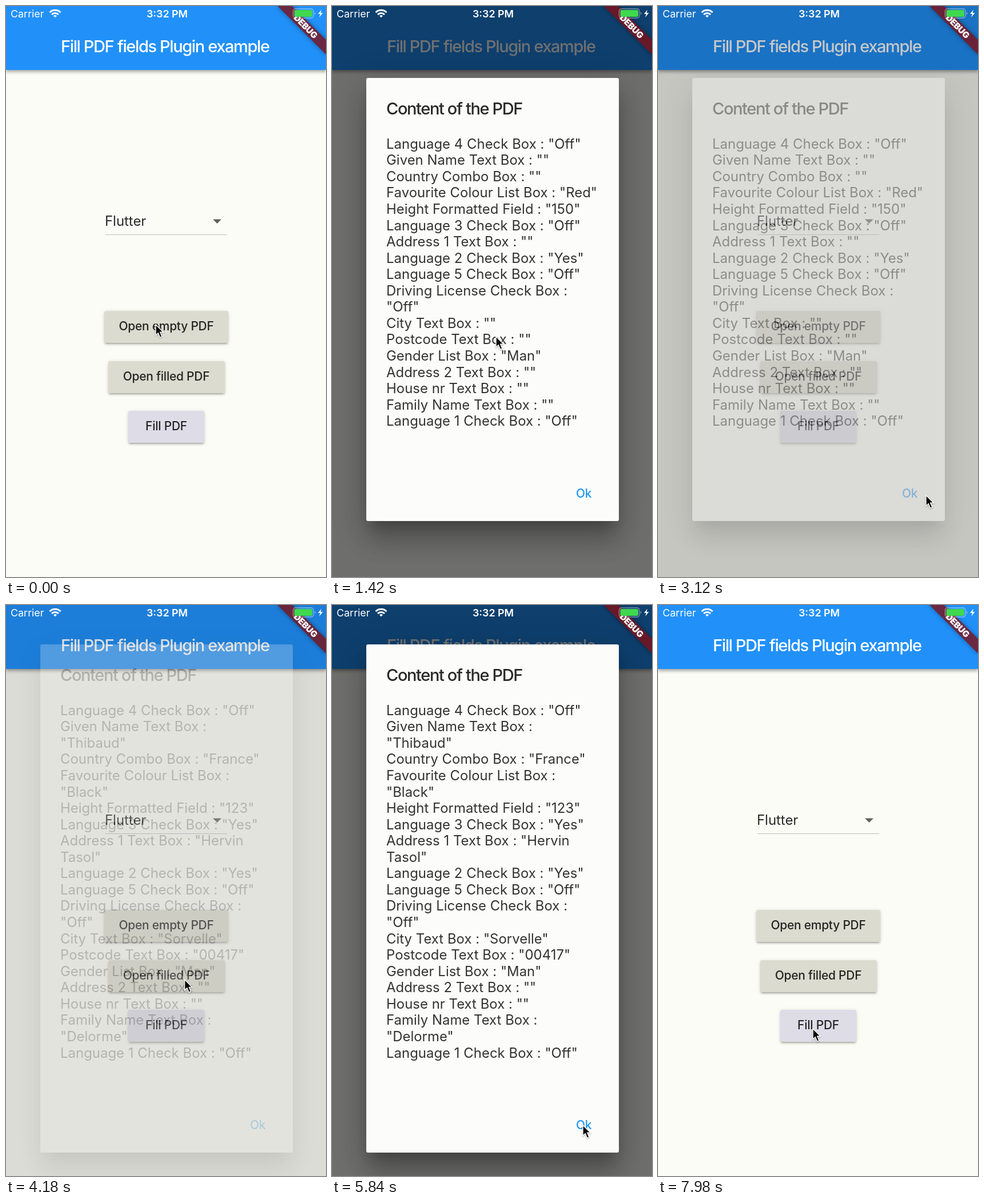
Animation, 560 px wide and 1000 px high, one loop 8000 ms. Source, as an HTML page:

```html
<!DOCTYPE html>
<html lang="en">
<head>
<meta charset="utf-8">
<title>Fill PDF fields</title>
<style>
  html, body { margin: 0; width: 100%; height: 100%; overflow: hidden; }
  body { position: relative; background: #fcfcf6; font: 23.9px/40px Inter, "Open Sans", sans-serif; color: rgba(0,0,0,.84); }
  body *, svg { position: absolute; }
  .t { white-space: pre; line-height: 40px; margin-top: -20px; }
  .mid { left: 0; width: 560px; text-align: center; }
  .title { font-size: 29px; font-weight: 500; letter-spacing: -1.38px; }
  .bar { left: 0; top: 0; width: 560px; height: 112px; background: #2191f9; color: #fff; box-shadow: 0 3px 6px rgba(0,0,0,.38); }
  .btn { height: 56px; border-radius: 3px; background: #dbdbcf; font-size: 20.9px; font-weight: 500; letter-spacing: -.2px;
    line-height: 54px; text-align: center; white-space: pre;
    box-shadow: 0 4px 2px -3px rgba(0,0,0,.2), 0 3px 3px rgba(0,0,0,.14), 0 1px 7px rgba(0,0,0,.12); }
  .rule { left: 174px; top: 400px; width: 213px; height: 1px; background: #bdbdbd; }
  #shade { inset: 0; background: rgba(0,0,0,.56); }
  .dialog { left: 59.5px; width: 442.5px; border-radius: 3px; background: #fcfcfa;
    box-shadow: 0 16px 22px -10px rgba(0,0,0,.2), 0 36px 40px -2px rgba(0,0,0,.2), 0 13px 60px 10px rgba(0,0,0,.12); }
  .dialog .title { left: 35.5px; top: 54px; }
  .body { left: 35.5px; top: 101.7px; white-space: pre; line-height: 28.57px; letter-spacing: .03px; color: rgba(0,0,0,.8); }
  .ok { left: 367.5px; bottom: 28px; font-size: 20.9px; font-weight: 500; letter-spacing: -.2px; color: #2196f3; }
  .band { left: 500px; top: 41.8px; width: 120px; height: 17.9px; transform-origin: 60px -41.8px; transform: rotate(45deg);
    background: rgba(122,18,26,.82); box-shadow: 0 0 9px rgba(0,0,0,.4); color: #fff;
    font-size: 15.2px; font-weight: 900; line-height: 18px; text-align: center; letter-spacing: -.3px; }
  .status { color: #fff; font-size: 17.9px; top: 13.5px; }
  svg { left: 0; top: 0; overflow: visible; }
</style>
</head>
<body>
<div class="bar"><div class="t title" style="left:96px;top:71px">Fill PDF fields Plugin example</div></div>
<div class="t" style="left:173px;top:377px">Flutter</div>
<svg width="560" height="1000"><path d="M362 373.5h15l-7.5 7.5z" fill="#606060"/></svg>
<div class="rule"></div>
<div class="btn" style="left:172px;top:534px;width:217px">Open empty PDF</div>
<div class="btn" style="left:178.5px;top:621.5px;width:204px">Open filled PDF</div>
<div class="btn" style="left:214px;top:709px;width:133px;background:#dedce7">Fill PDF</div>

<div id="shade"></div>
<div class="dialog" style="top:126px;height:776px">
  <div class="t title">Content of the PDF</div>
  <div class="body">Language 4 Check Box : "Off"
Given Name Text Box : ""
Country Combo Box : ""
Favourite Colour List Box : "Red"
Height Formatted Field : "150"
Language 3 Check Box : "Off"
Address 1 Text Box : ""
Language 2 Check Box : "Yes"
Language 5 Check Box : "Off"
Driving License Check Box :
"Off"
City Text Box : ""
Postcode Text Box : ""
Gender List Box : "Man"
Address 2 Text Box : ""
House nr Text Box : ""
Family Name Text Box : ""
Language 1 Check Box : "Off"</div>
  <div class="t ok">Ok</div>
</div>
<div class="dialog" style="top:69px;height:890px">
  <div class="t title">Content of the PDF</div>
  <div class="body">Language 4 Check Box : "Off"
Given Name Text Box :
"Thibaud"
Country Combo Box : "France"
Favourite Colour List Box :
"Black"
Height Formatted Field : "123"
Language 3 Check Box : "Yes"
Address 1 Text Box : "Hervin
Tasol"
Language 2 Check Box : "Yes"
Language 5 Check Box : "Off"
Driving License Check Box :
"Off"
City Text Box : "Sorvelle"
Postcode Text Box : "00417"
Gender List Box : "Man"
Address 2 Text Box : ""
House nr Text Box : ""
Family Name Text Box :
"Delorme"
Language 1 Check Box : "Off"</div>
  <div class="t ok">Ok</div>
</div>

<div class="band">DEBUG</div>
<div class="t status" style="left:8px">Carrier</div>
<div class="t status mid" style="left:2px;font-weight:600">3:32 PM</div>
<svg width="560" height="1000">
  <g fill="none" stroke="#fff" stroke-width="3">
    <path d="M76.5 11.2a13.5 13.5 0 0 1 19 0M80 15a8.5 8.5 0 0 1 12 0"/>
    <path d="M83 17.2q3-2.4 6 0l-3 3z" fill="#fff" stroke="none"/>
  </g>
  <rect x="502.5" y="5" width="35.5" height="16" rx="4" fill="none" stroke="#fff" stroke-opacity=".45" stroke-width="1.4"/>
  <rect x="504.5" y="7" width="31.5" height="12" rx="2" fill="#3fd84f"/>
  <path d="M540 10.5q3 2.5 0 5z" fill="#fff" fill-opacity=".5"/>
  <path d="M552 6.5l-6 7.5h4l-2 6 6.5-8h-4z" fill="#fff"/>
  <path id="cursor" d="M0 0V18.5L4.2 14.6 7.6 22.4 11 20.9 7.7 13.3H13.3z" stroke="#fff" stroke-width="1.4"
    style="filter:drop-shadow(0 1px 1px rgba(0,0,0,.35))"/>
</svg>

<script>
const LOOP = 8000, FADE = 180;
const shade = document.getElementById('shade');
const cursor = document.getElementById('cursor');
const dialogs = [...document.querySelectorAll('.dialog')];
const spans = [[380, 2994], [4150, 6778]]; // opening and closing time of each dialog
const path = [ // time, x, y
  [0, 262, 558], [700, 262, 558], [1420, 287, 579], [1800, 287, 579],
  [2700, 469, 857], [3130, 469, 857], [3300, 456, 843], [3900, 310, 655],
  [4580, 317, 658], [5000, 317, 658], [5700, 439, 911], [6600, 439, 911],
  [6800, 439, 907], [6960, 439, 907], [7380, 285, 742], [7700, 271, 742], [LOOP, 271, 742]
];
const clamp = v => Math.min(1, Math.max(0, v));
const smooth = v => v * v * (3 - 2 * v);
const easeOut = v => 1 - (1 - v) ** 1.4;

function draw(t) {
  let dim = 0;
  spans.forEach(([open, close], i) => {
    const alpha = easeOut(Math.min(clamp((t - open) / FADE), clamp(1 - (t - close) / FADE)));
    dialogs[i].style.opacity = alpha;
    dim = Math.max(dim, alpha);
  });
  shade.style.opacity = dim;

  const i = path.findIndex(p => p[0] > t);
  const [t0, x0, y0] = path[i - 1], [t1, x1, y1] = path[i];
  const k = smooth((t - t0) / (t1 - t0));
  cursor.setAttribute('transform', `translate(${x0 + (x1 - x0) * k} ${y0 + (y1 - y0) * k})`);
}

const start = performance.now();
function tick() {
  draw((performance.now() - start) % LOOP);
  requestAnimationFrame(tick);
}
tick();
</script>
</body>
</html>
```
